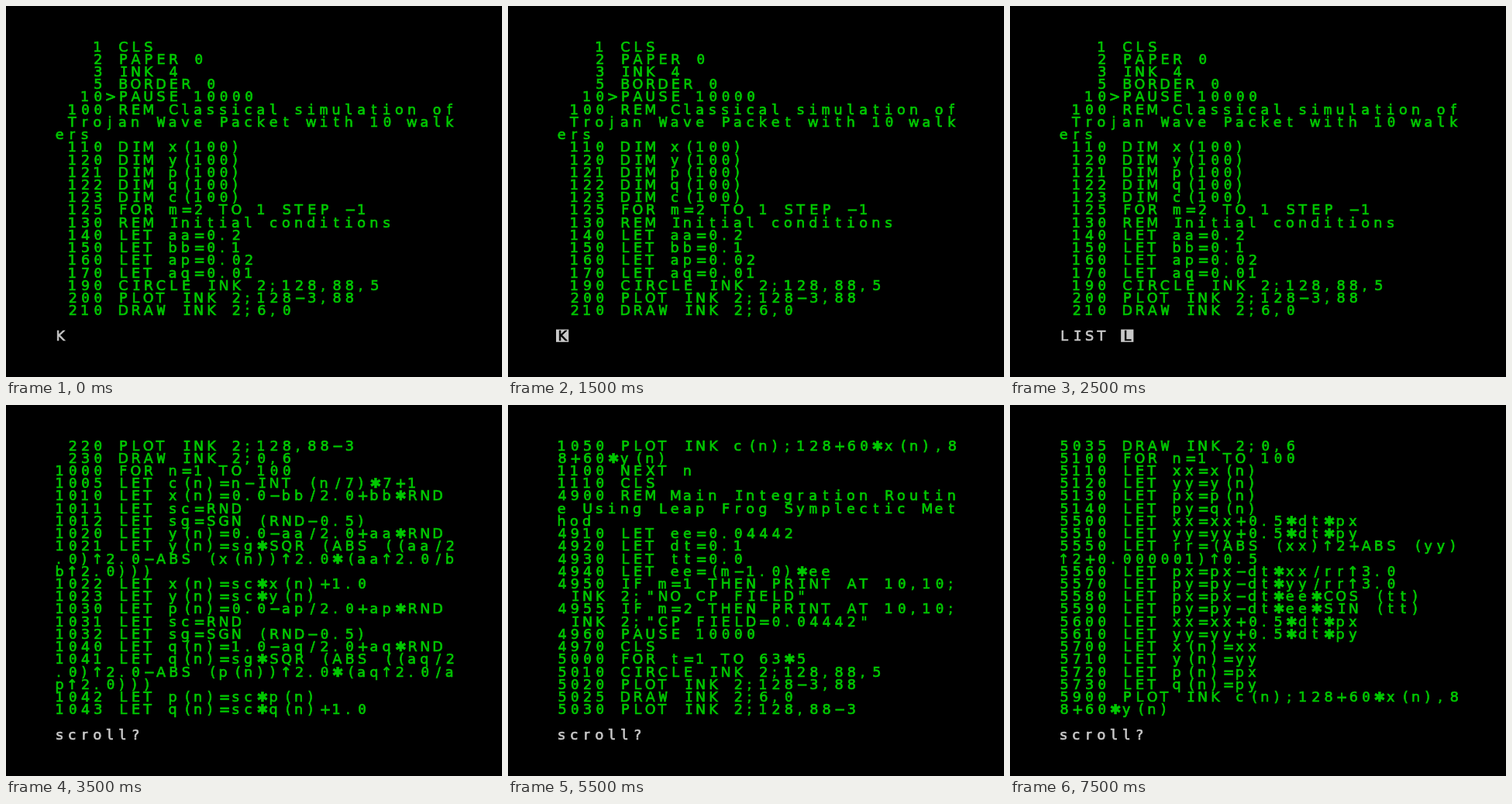
Write an HTML page with a canvas that moves like this. It is 640 px wide and 479 px high and loops after 8000 ms.

```html
<!DOCTYPE html>
<html lang="en">
<head>
<meta charset="utf-8">
<title>BASIC listing</title>
<style>
  html, body { margin: 0; width: 100%; height: 100%; overflow: hidden; background: #000; }
  canvas { display: block; width: 100vw; height: 100vh; }
</style>
</head>
<body>
<canvas id="screen" width="640" height="479"></canvas>
<script>
const listing = `   1 CLS
   2 PAPER 0
   3 INK 4
   5 BORDER 0
  10>PAUSE 10000
 100 REM Classical simulation of Trojan Wave Packet with 10 walkers
 110 DIM x(100)
 120 DIM y(100)
 121 DIM p(100)
 122 DIM q(100)
 123 DIM c(100)
 125 FOR m=2 TO 1 STEP -1
 130 REM Initial conditions
 140 LET aa=0.2
 150 LET bb=0.1
 160 LET ap=0.02
 170 LET aq=0.01
 190 CIRCLE INK 2;128,88,5
 200 PLOT INK 2;128-3,88
 210 DRAW INK 2;6,0
 220 PLOT INK 2;128,88-3
 230 DRAW INK 2;0,6
1000 FOR n=1 TO 100
1005 LET c(n)=n-INT (n/7)*7+1
1010 LET x(n)=0.0-bb/2.0+bb*RND
1011 LET sc=RND
1012 LET sg=SGN (RND-0.5)
1020 LET y(n)=0.0-aa/2.0+aa*RND
1021 LET y(n)=sg*SQR (ABS ((aa/2.0)↑2.0-ABS (x(n))↑2.0*(aa↑2.0/bb↑2.0)))
1022 LET x(n)=sc*x(n)+1.0
1023 LET y(n)=sc*y(n)
1030 LET p(n)=0.0-ap/2.0+ap*RND
1031 LET sc=RND
1032 LET sg=SGN (RND-0.5)
1040 LET q(n)=1.0-aq/2.0+aq*RND
1041 LET q(n)=sg*SQR (ABS ((aq/2.0)↑2.0-ABS (p(n))↑2.0*(aq↑2.0/ap↑2.0)))
1042 LET p(n)=sc*p(n)
1043 LET q(n)=sc*q(n)+1.0
1050 PLOT INK c(n);128+60*x(n),88+60*y(n)
1100 NEXT n
1110 CLS
4900 REM Main Integration Routine Using Leap Frog Symplectic Method
4910 LET ee=0.04442
4920 LET dt=0.1
4930 LET tt=0.0
4940 LET ee=(m-1.0)*ee
4950 IF m=1 THEN PRINT AT 10,10; INK 2;"NO CP FIELD"
4955 IF m=2 THEN PRINT AT 10,10; INK 2;"CP FIELD=0.04442"
4960 PAUSE 10000
4970 CLS
5000 FOR t=1 TO 63*5
5010 CIRCLE INK 2;128,88,5
5020 PLOT INK 2;128-3,88
5025 DRAW INK 2;6,0
5030 PLOT INK 2;128,88-3
5035 DRAW INK 2;0,6
5100 FOR n=1 TO 100
5110 LET xx=x(n)
5120 LET yy=y(n)
5130 LET px=p(n)
5140 LET py=q(n)
5500 LET xx=xx+0.5*dt*px
5510 LET yy=yy+0.5*dt*py
5550 LET rr=(ABS (xx)↑2+ABS (yy)↑2+0.000001)↑0.5
5560 LET px=px-dt*xx/rr↑3.0
5570 LET py=py-dt*yy/rr↑3.0
5580 LET px=px-dt*ee*COS (tt)
5590 LET py=py-dt*ee*SIN (tt)
5600 LET xx=xx+0.5*dt*px
5610 LET yy=yy+0.5*dt*py
5700 LET x(n)=xx
5710 LET y(n)=yy
5720 LET p(n)=px
5730 LET q(n)=py
5900 PLOT INK c(n);128+60*x(n),88+60*y(n)`;

const COLUMNS = 32, PAGE = 22, STATUS_ROW = 23, LOOP = 8000;
const LEFT = 62, TOP = 44.3, CELL = 16.23, DOT = CELL / 8;
const GREEN = "#00c800", WHITE = "#c8c8c8";
const SANS = '17.5px "DejaVu Sans", sans-serif';
const MONO = '17.5px "DejaVu Sans Mono", monospace';

const rows = listing.split("\n").flatMap(line => line.match(new RegExp(`.{1,${COLUMNS}}`, "g")));
const ctx = document.getElementById("screen").getContext("2d");
const rowTop = row => TOP + row * CELL;

// Horizontal centre of a character in its cell of eight dots.
function centre(char) {
  if (char === "(") return 5;
  if (/[).,;]/.test(char)) return 3;
  if (/[-+*=\/I]/.test(char)) return 4.5;
  return /[a-z1T↑]/.test(char) ? 3.5 : 4;
}

function drawText(text, row, color, column = 0) {
  ctx.fillStyle = ctx.strokeStyle = color;
  ctx.lineWidth = 0.7;
  ctx.lineJoin = "miter";
  ctx.textAlign = "center";
  [...text].forEach((char, i) => {
    if (char === " ") return;
    const glyph = { "-": "−", "*": "✱" }[char] || char;
    const x = LEFT + (column + i) * CELL + centre(char) * DOT;
    const y = rowTop(row) + 7 * DOT;
    ctx.font = /[0IWilm]/.test(char) ? MONO : SANS;
    ctx.fillText(glyph, x, y);
    ctx.strokeText(glyph, x, y);
  });
}

function drawCursor(letter, column) {
  ctx.fillStyle = WHITE;
  ctx.fillRect(LEFT + column * CELL, rowTop(STATUS_ROW), CELL, CELL);
  drawText(letter, STATUS_ROW, "#000", column);
}

function drawPage(start) {
  rows.slice(start, start + PAGE).forEach((text, row) => drawText(text, row, GREEN));
}

function drawBand(text, row, from, to) {
  ctx.save();
  ctx.beginPath();
  ctx.rect(0, rowTop(row) + from * DOT, 640, (to - from) * DOT);
  ctx.clip();
  drawText(text, row, GREEN);
  ctx.restore();
}

// Caught mid-scroll: the top two dot lines of each row already hold the next row.
function drawScrolling(start) {
  for (let row = 0; row < PAGE; row++) {
    drawBand(row < PAGE - 1 ? rows[start + row + 1] : "", row, 0, 2);
    drawBand(rows[start + row], row, 2, 8);
  }
}

function draw(time) {
  ctx.fillStyle = "#000";
  ctx.fillRect(0, 0, 640, 479);
  if (time < 3000) {
    drawPage(0);
    if (time < 1500) drawText("K", STATUS_ROW, WHITE);
    else if (time < 2500) drawCursor("K", 0);
    else {
      drawText("LIST", STATUS_ROW, WHITE);
      drawCursor("L", 5);
    }
  } else if (time < 3500) {
    drawScrolling(12);
  } else {
    drawPage(PAGE * (time < 5500 ? 1 : time < 7500 ? 2 : 3));
    drawText("scroll?", STATUS_ROW, WHITE);
  }
}

const startTime = performance.now();
function tick() {
  draw((performance.now() - startTime) % LOOP);
  requestAnimationFrame(tick);
}
tick();
</script>
</body>
</html>
```
